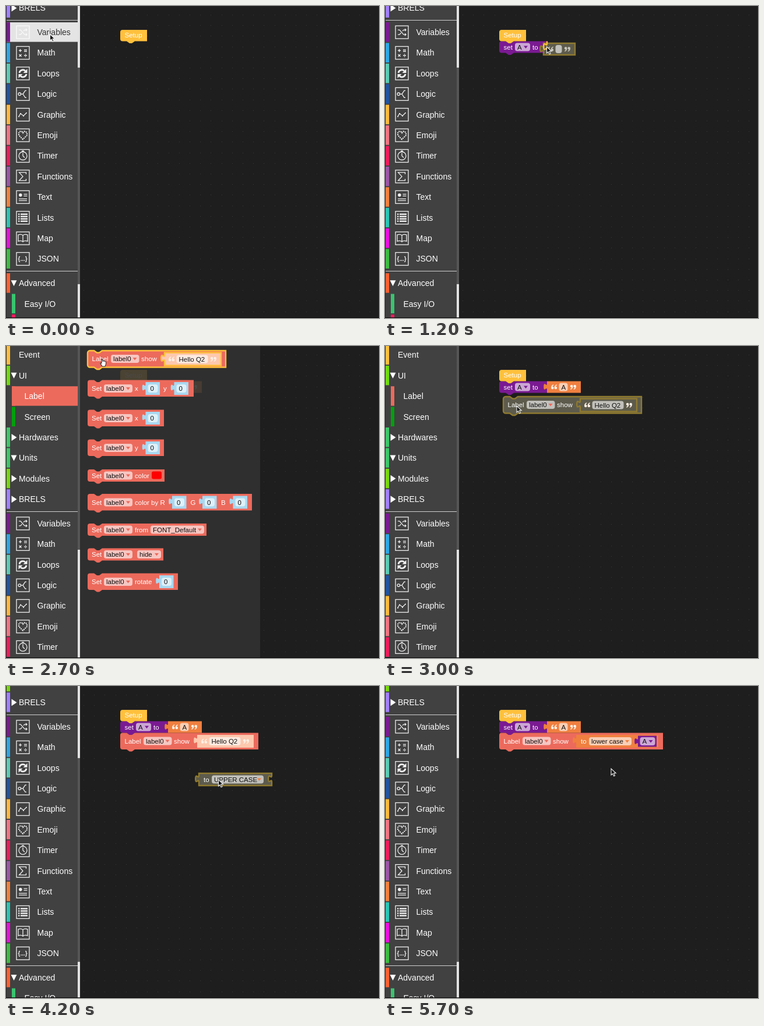
An HTML page with a canvas that plays this animation: 640 px wide and 536 px high, repeating every 6000 ms.

```html
<!DOCTYPE html>
<html lang="en">
<head>
<meta charset="utf-8">
<title>Block editor</title>
<style>
html, body { margin: 0; width: 100%; height: 100%; overflow: hidden; background: #1e1e1e; }
canvas { display: block; }
</style>
</head>
<body>
<canvas id="stage" width="640" height="536"></canvas>
<script>
(() => {
const c = document.getElementById('stage').getContext('2d');
const STEP = 300, LOOP = 6000;
const SANS = '"Liberation Sans", Arial, sans-serif';
const YELLOW = '#ffc03c', PURPLE = '#7a1a92', ORANGE = '#f08040', CORAL = '#ec6a5c';
const PEACH = '#fdc8ae', BLUE = '#a9d8f0', GHOST = '#5d5b4c', GHOST_EDGE = '#8f7a2f';
const GREETING = 'Hello Q2';

// ---------- primitives ----------
function rect(x, y, w, h, color) {
  c.fillStyle = color;
  c.fillRect(x, y, w, h);
}
function round(x, y, w, h, r, color) {
  c.fillStyle = color;
  c.beginPath();
  c.roundRect(x, y, w, h, r);
  c.fill();
}
function text(str, x, y, color = '#fff', size = 11.5, weight = '') {
  c.font = `${weight} ${size}px ${SANS}`;
  c.fillStyle = color;
  c.fillText(str, x, y + size * 0.355);
}
function shape(d, color) {
  c.fillStyle = color;
  c.fill(new Path2D(d));
}
function at(x, y, draw) {
  c.save();
  c.translate(x, y);
  draw();
  c.restore();
}

// ---------- block parts ----------
const TAB = 'c0,7.2 -5.8,-5.8 -5.8,5.4 s5.8,-1.8 5.8,5.4';
const TAB_UP = 'c0,-7.2 -5.8,5.8 -5.8,-5.4 s5.8,1.8 5.8,-5.4';

function paint(d, color, edge) {
  const p = new Path2D(d);
  c.fillStyle = color;
  c.fill(p);
  if (edge) {
    c.strokeStyle = edge;
    c.lineWidth = 2.4;
    c.stroke(p);
  }
}
function stack(x, y, w, h, color, { edge, socket, first } = {}) {
  const notch = first ? '' : 'h7 l5,3.5 h4 l5,-3.5';
  paint(`M${x},${y + 4} a4,4 0 0 1 4,-4 ${notch} H${x + w} ${socket ? 'v4' + TAB : ''} V${y + h}
    H${x + 25} l-5,3.5 h-4 l-5,-3.5 H${x + 4} a4,4 0 0 1 -4,-4 z`, color, edge);
}
function value(x, y, w, h, color, { edge, socket } = {}) {
  const side = socket ? `V${y + 14.8} ${TAB_UP} V${y}` : `V${y}`;
  paint(`M${x},${y} v4 ${TAB} V${y + h} h${w} ${side} z`, color, edge);
}
function field(x, mid, w, str, arrow) {
  round(x, mid - 7, w, 14, 4, 'rgba(255,255,255,.62)');
  text(str, x + 4, mid, '#111');
  if (arrow) shape(`M${x + w - 11},${mid - 2} h7 l-3.5,4.5 z`, arrow);
}
function quote(x, y, flip, color) {
  at(x, y, () => {
    if (flip) c.rotate(Math.PI);
    for (const dx of [-2.8, 2.8])
      at(dx, 0, () => shape('M-2.2,1.5 C-2.2,-2 -.5,-4 2,-4.3 V-3 Q.2,-2.3 0,-.8 A2.3,2.3 0 1 1 -2.2,1.5 z', color));
  });
}
function number(x, mid) {
  value(x, mid - 11, 24.5, 22, BLUE);
  field(x + 4, mid, 17, '0');
}
function quoted(x, y, w, h, str, color, edge, mark = '#fff0e6') {
  const mid = y + h / 2;
  value(x, y, w, h, color, { edge });
  quote(x + 12, mid, false, mark);
  field(x + 20.5, mid, w - 43, str);
  quote(x + w - 13, mid, true, mark);
}

// ---------- whole blocks ----------
function setup() {
  stack(196, 41, 46, 19.5, YELLOW, { first: true });
  text('Setup', 203.5, 50);
}
function setBlock(x, y, edge) {
  stack(x, y, 82, 20, PURPLE, { edge, socket: true });
  text('set', x + 7.5, y + 10);
  field(x + 27, y + 10, 26, 'A', PURPLE);
  text('to', x + 57, y + 10);
}
function variable(x, y, color = PURPLE, edge) {
  value(x, y, 32, 19, color, { edge });
  field(x + 3.5, y + 9.5, 26, 'A', PURPLE);
}
function convert(x, y, upper, { color = ORANGE, edge, h = 21, filled } = {}) {
  const fieldW = upper ? 89 : 73, mid = y + h / 2;
  value(x, y, fieldW + (filled ? 68 : 36), h, color, { edge, socket: !filled });
  text('to', x + 8, mid);
  field(x + 22, mid, fieldW, upper ? 'UPPER CASE' : 'lower case', ORANGE);
  if (filled) variable(x + 106, y + 1.5);
}
function label(x, y, { w = 237, color = CORAL, edge, inner } = {}) {
  stack(x, y, w, 28.5, color, { edge });
  text('Label', x + 7.5, y + 14);
  field(x + 40, y + 14, 48.5, 'label0', CORAL);
  text('show', x + 92, y + 14);
  if (inner) inner();
  else quoted(x + 132, y + 3.5, 97, 22, GREETING, color === CORAL ? PEACH : color, edge);
}
function program(p) {
  if (p.set) setBlock(196, 60.5, p.set === 2 ? YELLOW : null);
  setup();
  if (p.str !== undefined)
    quoted(278, 60.5, p.str ? 58 : 55, 20, p.str, ORANGE, p.strEdge);
  if (p.conv) {
    const upper = p.conv === 'upper', filled = p.conv === 'full';
    label(196, 80.5, {
      w: upper ? 265 : filled ? 281 : 249,
      inner: () => convert(328, 84, upper, { edge: p.convEdge, h: 22, filled })
    });
  } else if (p.label) label(196, 80.5, { edge: p.label === 2 ? YELLOW : null });
}

// ---------- flyouts ----------
function panel(w) {
  rect(127, 0, w, 536, 'rgba(50,50,50,.88)');
}
function labelPanel() {
  panel(309);
  label(140, 8, { edge: YELLOW });
  const row = (y, h, right, draw) => {
    const mid = y + (h > 25 ? 14.5 : 10.5);
    stack(140, y, right - 140, h, CORAL);
    text('Set', 147, mid);
    field(168, mid, 49, 'label0', CORAL);
    draw(mid);
  };
  row(58.5, 28.5, 322, m => {
    text('x', 221, m); number(239.5, m);
    text('y', 270, m); number(288.5, m);
  });
  row(109.5, 28.5, 271, m => { text('x', 221, m); number(239.5, m); });
  row(160.5, 28.5, 271, m => { text('y', 221, m); number(239.5, m); });
  row(212, 21, 272, m => { text('color', 221, m); round(250, m - 7, 17, 13, 3, '#f00'); });
  row(254, 28.5, 422, m => {
    text('color by R', 221, m); number(285, m);
    text('G', 316.5, m); number(337, m);
    text('B', 369, m); number(389.5, m);
  });
  row(305, 21, 344, m => { text('from', 221, m); field(248, m, 92, 'FONT_Default', CORAL); });
  row(347.5, 21, 270, m => field(225, m, 41, 'hide', CORAL));
  row(390.5, 28.5, 295, m => { text('rotate', 221, m); number(263, m); });
}
function variablePanel() {
  panel(190);
  round(140, 10, 108, 24, 4, '#555');
  text('Create variable', 151, 22);
  setBlock(140, 50);
  stack(140, 92, 138, 28.5, PURPLE);
  text('change', 147, 106);
  field(188, 106, 26, 'A', PURPLE);
  text('by', 218, 106);
  number(243, 106);
  variable(146, 142);
}
function textPanel() {
  panel(250);
  const row = (y, w, str) => {
    value(146, y, w, 21, ORANGE, { socket: true });
    text(str, 154, y + 10.5);
  };
  quoted(146, 12, 55, 20, '', ORANGE);
  row(52, 104, 'create text');
  row(94, 94, 'length of');
  row(136, 88, 'is empty');
  convert(146, 178, true);
  row(220, 104, 'reverse text');
}
function menu() {
  rect(350, 104, 112, 66, '#fff');
  rect(350, 127, 112, 20, '#e0e0e0');
  ['UPPER CASE', 'lower case', 'Title Case'].forEach((s, i) => text(s, 368, 116 + i * 21, '#111'));
}

// ---------- sidebar ----------
// name, strip colour, kind: > closed group, v open group, c child, i icon
const ROWS = [
  ['Event', '#ffbf3c', ''], ['UI', '#70dc0c', 'v'], ['Label', CORAL, 'c'], ['Screen', '#00a00c', 'c'],
  ['Hardwares', '#3cc868', '>'], ['Units', '#3cc868', 'v'], ['Modules', '#78d80c', '>'], ['BRELS', '#a080ff', '>'],
  ['Variables', PURPLE, 'i'], ['Math', '#2ea7e6', 'i'], ['Loops', '#5bcbb5', 'i'], ['Logic', '#2154a0', 'i'],
  ['Graphic', '#ffb93c', 'i'], ['Emoji', '#f27482', 'i'], ['Timer', '#f01c5c', 'i'], ['Functions', '#9c56a6', 'i'],
  ['Text', '#f4803c', 'i'], ['Lists', '#2ac5b4', 'i'], ['Map', '#ea10e0', 'i'], ['JSON', '#3cbc40', 'i'],
  ['Advanced', '#ff6030', 'v'], ['Easy I/O', '#39c56f', 'c'], ['Execute', '#f01c60', 'c']
];
const ICONS = {
  Variables: 'M-7,-4 h3 l7,8 h4 M-7,4 h3 l2.5,-3 M1,-2 l2,-2 h4 M5,-6 l2,2 -2,2 M5,2 l2,2 -2,2',
  Math: 'M-7,-4 h5 M-4.5,-6.5 v5 M2,-5 h5 M2,-2.5 h5 M-6.5,2.5 l4,4 m0,-4 l-4,4 M2,4.5 h5 M4.5,1.8 v1.2 M4.5,6 v1.2',
  Logic: 'M-8,0 a2.3,2.3 0 1 0 4.6,0 a2.3,2.3 0 1 0 -4.6,0 M-3.4,0 h3.4 M6,-6 l-2,0 -4,6 4,6 h2',
  Graphic: 'M-7,3 l3,-5 5,4 5,-5 M-8,3.5 h2 M-5,-2 h2 M0,2.5 h2 M5,-3 h2',
  Emoji: 'M0,7 l-7,-7 v-4 l2,-2.5 h3 l2,2.5 2,-2.5 h3 l2,2.5 v4 z',
  Timer: 'M-7,0 a7,7 0 1 0 14,0 a7,7 0 1 0 -14,0 M0,-5 v5 l3,3 M-2,-8.5 h4',
  Functions: 'M5.5,-4 v-3 h-12 l6.5,7 -6.5,7 h12 v-3',
  Text: 'M1.5,-5 h6 M1.5,-2 h6 M-7,3 h14 M-7,6 h14',
  Map: 'M0,-5 c-2,-2 -5,-2 -8,-1 v11 c3,-1 6,-1 8,1 c2,-2 5,-2 8,-1 v-11 c-3,-1 -6,-1 -8,1 v11'
};
function icon(name, y, ink) {
  at(29, y, () => {
    c.strokeStyle = c.fillStyle = ink;
    c.lineWidth = 1.3;
    c.strokeRect(-11, -11, 22, 22);
    if (name === 'Emoji') {
      c.setLineDash([2, 1.3]);
      c.lineWidth = 2;
    }
    if (ICONS[name]) c.stroke(new Path2D(ICONS[name]));
    if (name === 'Text') shape('M-7,-3.5 a2.8,2.8 0 1 0 5.6,0 a2.8,2.8 0 1 0 -5.6,0', ink);
    if (name === 'JSON') text('{...}', -8.5, 0, ink, 10, 'bold');
    if (name === 'Lists')
      for (let i = -6; i <= 6; i += 4) {
        rect(-8, i - 1.2, 2.4, 2.4, ink);
        rect(-4, i - 1.2, 12, 2.4, ink);
      }
    if (name === 'Loops') {
      c.lineWidth = 2.8;
      c.stroke(new Path2D('M-6,-1 a6,6 0 0 1 10,-3.5 M6,1 a6,6 0 0 1 -10,3.5'));
      shape('M7.5,-8 v7 h-7 z M-7.5,8 v-7 h7 z', ink);
    }
  });
}
function sidebar({ scroll, open, hover, pick }) {
  rect(0, 0, 127, 536, '#414141');
  rect(123, 0, 4, 536, '#e2e2e2');
  rect(123, scroll * (open ? 0.527 : 0.56), 4, open ? 350 : 372, '#565656');
  let y = 15.4 - scroll;
  for (const [name, color, kind] of ROWS) {
    if (!open && (name === 'Label' || name === 'Screen')) continue;
    if (name === 'Variables' || name === 'Advanced') {
      rect(0, Math.round(y - 15), 123, 1, '#d0d0d0');
      y += 6.3;
    }
    const child = kind === 'c', left = child ? 10 : 1;
    const lit = name === hover;
    if (lit) rect(left, y - 17, 123 - left, 33.5, '#e4e4e4');
    if (name === pick) rect(left, y - 17, 123 - left, 33.5, color);
    rect(left, y - 17, 6, 33.5, color);
    if (kind === 'i') icon(name, y, lit ? '#fafafa' : '#f0f0f0');
    if (kind === '>') shape(`M9.5,${y - 6} l9,6 -9,6 z`, '#fff');
    if (kind === 'v') shape(`M8.5,${y - 5} h10 l-5,10 z`, '#fff');
    text(name, kind === 'i' ? 53.5 : child ? 31.5 : 22, y, lit ? '#333' : '#fff', 14);
    y += 35.4;
  }
  rect(0, 0, 1, 536, '#222');
}

// ---------- pointer ----------
function pointer([x, y], hand) {
  at(x, y, () => {
    const p = new Path2D(hand
      ? 'M2,0 q1.5,-1 2,1 l0,2 q1,-1 2,0 q1,-1 2,.5 q1.5,-.5 1.5,1.5 v3 l-1.5,4 h-5 l-3,-5 q0,-1.5 2,-.5 z'
      : 'M0,0 V11 l2.6,-2.4 1.9,4.2 2,-.9 -1.9,-4.1 h3.6 z');
    c.fillStyle = hand ? '#fff' : '#111';
    c.strokeStyle = hand ? '#333' : '#eee';
    c.lineWidth = 1.1;
    c.fill(p);
    c.stroke(p);
  });
}

// ---------- story, one entry per step ----------
const ghost = { color: GHOST, edge: GHOST_EDGE };
const low = { scroll: 189 }, high = { scroll: 0, open: true }, end = { scroll: 235, open: true };
const withA = { set: 1, str: 'A' }, shown = { ...withA, label: 1 };
const STORY = [
  { bar: { ...low, hover: 'Variables' }, cur: [75.5, 48.5] },
  { bar: { ...low, pick: 'Variables' }, fly: variablePanel, cur: [152, 58] },
  { bar: low, prog: { set: 2 }, cur: [134.5, 140] },
  { bar: { ...low, pick: 'Text' }, prog: { set: 1 }, fly: textPanel, cur: [152, 20] },
  { bar: low, prog: { set: 1 }, cur: [277.5, 70], over() {
    quoted(272, 64, 54, 20, '', GHOST, GHOST_EDGE, '#c8c6ba');
    c.strokeStyle = YELLOW;
    c.lineWidth = 2.4;
    c.stroke(new Path2D(`M278,60.5 v4 ${TAB}`));
  } },
  { bar: low, prog: { set: 1, str: '', strEdge: YELLOW }, cur: [298, 72] },
  { bar: low, prog: { ...withA, strEdge: YELLOW }, cur: [298, 72] },
  { bar: { scroll: 0 }, prog: withA, cur: [44, 52] },
  { bar: { ...high, hover: 'Label' }, prog: withA, cur: [54, 88] },
  { bar: { ...high, pick: 'Label' }, prog: withA, fly: labelPanel, cur: [162, 23], hand: true },
  { bar: high, prog: withA, cur: [226, 103], over: () => label(203, 87, ghost) },
  { bar: { scroll: 110, open: true }, prog: { ...withA, label: 2 }, cur: [92, 160] },
  { bar: { scroll: 215, open: true, hover: 'Variables' }, prog: { ...withA, label: 2 }, cur: [88.5, 195] },
  { bar: { ...end, pick: 'Text' }, prog: shown, fly: textPanel, cur: [158, 188] },
  { bar: end, prog: shown, cur: [364.5, 161], over: () => convert(331, 150, true, ghost) },
  { bar: end, prog: { ...shown, conv: 'upper', convEdge: YELLOW }, cur: [361, 100] },
  { bar: end, prog: { ...shown, conv: 'upper' }, over: menu, cur: [394, 136] },
  { bar: { ...end, pick: 'Variables' }, prog: { ...shown, conv: 'lower' }, fly: variablePanel, cur: [150, 150] },
  { bar: end, prog: { ...shown, conv: 'lower' }, cur: [440, 102],
    over: () => variable(435, 91, GHOST, GHOST_EDGE) },
  { bar: end, prog: { ...shown, conv: 'full' }, cur: [388, 142] }
];

function draw(s) {
  rect(0, 0, 640, 536, '#1e1e1e');
  for (let y = 15; y < 536; y += 18.2)
    for (let x = 133; x < 640; x += 18.2) rect(Math.round(x), Math.round(y), 1, 1, '#3a3a3a');
  program(s.prog || {});
  if (s.fly) s.fly();
  if (s.over) s.over();
  sidebar(s.bar);
  rect(0, 535, 640, 1, '#080808');
  pointer(s.cur, s.hand);
}

const start = performance.now();
function tick() {
  const t = (performance.now() - start) % LOOP;
  draw(STORY[Math.floor(t / STEP)]);
  requestAnimationFrame(tick);
}
tick();
})();
</script>
</body>
</html>
```
